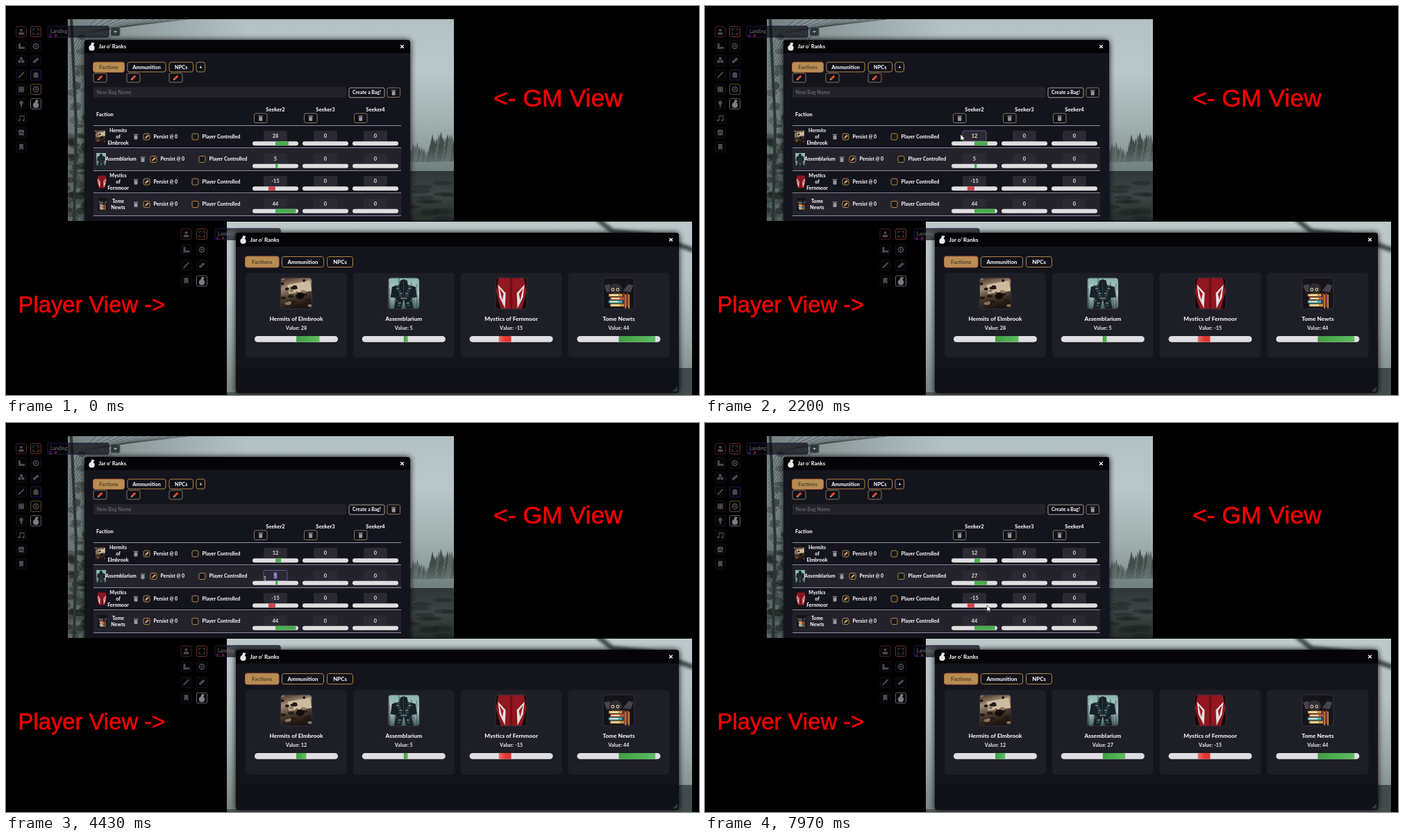
An HTML page with a canvas for the animation above (8000 ms loop, 998 by 561 pixels).

```html
<!DOCTYPE html>
<html lang="en">
<head>
<meta charset="utf-8">
<title>Faction tracker</title>
<style>
  html, body { margin: 0; width: 100%; height: 100%; overflow: hidden; background: #000; }
  canvas { display: block; }
</style>
</head>
<body>
<canvas id="stage" width="998" height="561"></canvas>
<script>
const ctx = document.getElementById('stage').getContext('2d');
const LOOP = 8000, TAN = '#b08648', WHITE = '#f3f2f5', INK = '#101018', TITLE = 'Jar o\u2019 Ranks';
const FACTIONS = ['Hermits of Elmbrook', 'Assemblarium', 'Mystics of Fernmoor', 'Tome Newts'];
const START_VALUES = [28, 5, -15, 44];
const EDITS = [
  { row: 0, value: 12, focus: 1150, type: 1900, commit: 2500, sync: 3300 },
  { row: 1, value: 27, focus: 3900, type: 6100, commit: 6550, sync: 6800 }
];
const MOVE_TIME = 500;
const MOVES = [
  { start: 600, x: 368, y: 185 }, { start: 2400, x: 372, y: 199 },
  { start: 3300, x: 373, y: 224 }, { start: 7350, x: 406, y: 263 }
];

function rect(x, y, w, h, fill, radius = 0, border) {
  ctx.beginPath();
  ctx.roundRect(x, y, w, h, radius);
  if (fill) { ctx.fillStyle = fill; ctx.fill(); }
  if (border) { ctx.strokeStyle = border; ctx.lineWidth = 1; ctx.stroke(); }
}
function path(pts) {
  ctx.beginPath();
  for (let i = 0; i < pts.length; i += 2) ctx.lineTo(pts[i], pts[i + 1]);
}
function poly(fill, ...pts) {
  path(pts);
  ctx.fillStyle = fill;
  ctx.fill();
}
function line(color, width, ...pts) {
  path(pts);
  ctx.strokeStyle = color;
  ctx.lineWidth = width;
  ctx.stroke();
}
function disc(x, y, rx, ry, fill) {
  ctx.beginPath();
  ctx.ellipse(x, y, rx, ry, 0, 0, 7);
  ctx.fillStyle = fill;
  ctx.fill();
}
function text(str, x, y, size = 7.3, color = WHITE, align = 'left', weight = 800) {
  ctx.font = `${weight} ${size}px Lato, sans-serif`;
  ctx.textAlign = align;
  ctx.textBaseline = 'middle';
  ctx.fillStyle = color;
  ctx.fillText(str, x, y + .3);
}
function caption(str, x, baseline, size) {
  ctx.font = `${size}px "Liberation Sans", Arial, sans-serif`;
  ctx.textAlign = 'left';
  ctx.textBaseline = 'alphabetic';
  ctx.fillStyle = ctx.strokeStyle = '#f00';
  ctx.lineWidth = .5;
  ctx.fillText(str, x, baseline);
  ctx.strokeText(str, x, baseline);
}
function gradient(x0, y0, x1, y1, ...colors) {
  const g = ctx.createLinearGradient(x0, y0, x1, y1);
  colors.forEach((c, i) => g.addColorStop(i / (colors.length - 1), c));
  return g;
}
function at(x, y, draw, sx = 1, sy = sx, angle = 0) {
  ctx.save();
  ctx.translate(x, y);
  ctx.rotate(angle);
  ctx.scale(sx, sy);
  draw();
  ctx.restore();
}
function mirrored(x, draw) {
  at(x, 0, draw);
  at(x, 0, draw, -1, 1);
}
function clipped(x, y, w, h, draw, radius = 0) {
  ctx.save();
  ctx.beginPath();
  ctx.roundRect(x, y, w, h, radius);
  ctx.clip();
  draw();
  ctx.restore();
}
function random(seed) {
  const s = Math.sin(seed * 127.1) * 43758.5453;
  return s - Math.floor(s);
}

function bag(x, y, color) {
  disc(x, y + 2, 4.2, 4, color);
  poly(color, x - 2, y - 1, x, y - 6, x + 4, y - 5, x + 2, y - 1);
}
function trash(x, y) {
  rect(x - 2.5, y - 2, 5, 6, '#99969f', 1);
  rect(x - 3.3, y - 3.7, 6.6, 1.1, '#99969f');
}
function trashButton(x, y) {
  rect(x, y, 18.5, 13.5, INK, 2, '#86765c');
  trash(x + 9.2, y + 6.8);
}
function pencil(x, y, color) {
  at(x, y, () => {
    rect(-3, -1.5, 7, 3, color, .5);
    poly('#eab48b', -3, -1.5, -5, 0, -3, 1.5);
  }, 1, 1, -Math.PI / 4);
}
function checkbox(x, y, checked) {
  rect(x - 4.5, y - 4.5, 9, 9, '#18151b', 2, TAN);
  if (checked) at(x, y, () => pencil(.5, 0, '#d8a55c'), .75);
}
function tab(label, x, y, w, h, size, active) {
  rect(x, y, w, h, active ? '#b78d53' : INK, 3, active ? '#b0653a' : TAN);
  text(label, x + w / 2, y + h / 2, size, active ? '#5a452c' : WHITE, 'center');
}
function bar(cx, y, half, height, value, unit, shade) {
  const w = Math.abs(value) * unit;
  rect(cx - half, y, half * 2, height, '#dfdfe1', height / 2);
  rect(value < 0 ? cx - w : cx, y, w, height, shade(value < 0, cx, w), 1);
}

const GLYPHS = {
  user: c => { disc(0, -2, 2, 2, c); rect(-4, 1, 8, 3.5, c, 2); },
  expand: c => { rect(-4, -4, 8, 8, null, 0, c); rect(-5, -1, 10, 2, '#060609'); rect(-1, -5, 2, 10, '#060609'); },
  ruler: c => { rect(-4, -4, 3, 8, c); rect(-4, 1, 9, 3, c); },
  target: c => { disc(0, 0, 4.4, 4.4, c); disc(0, 0, 2.8, 2.8, '#08080b'); disc(0, 0, 1.4, 1.4, c); },
  cubes: c => { for (let k = 0; k < 3; k++) disc(2.8 * Math.sin(k * 2.1), -2.8 * Math.cos(k * 2.1), 2.3, 2.3, c); },
  stick: c => line(c, 3.4, -3.5, 3, 3.5, -3),
  pencil: c => line(c, 2, -4, 4, 4, -4),
  ghost: c => rect(-3.5, -4, 7, 8, c, [4, 4, 1, 1]),
  dice: c => { rect(-4, -4, 8, 8, c, 1); for (let k = 0; k < 4; k++) disc(k % 2 * 4 - 2, k > 1 ? 2 : -2, .8, .8, '#08080b'); },
  bulb: c => { disc(0, -1.5, 2.8, 3, c); rect(-1, 1, 2, 4, c); },
  music: c => { for (const x of [-3, 3]) { disc(x, 3, 1.7, 1.4, c); rect(x + .7, -4, 1, 7, c); } rect(-2, -4, 6, 1.5, c); },
  map: c => { rect(-4, -4, 8, 8, c, 1); line('#08080b', 1, -4, 2, 0, -1, 4, 2); },
  mark: c => poly(c, -3, -4.5, 3, -4.5, 3, 4.5, 0, 2, -3, 4.5),
  bag: () => bag(0, 0, '#7c7c80')
};
const TOOL_BORDERS = { user: '#4a1a16', expand: '#70301c', ghost: '#1e2058', bag: '#626267' };
function toolColumn(x, y, step, names) {
  names.split(' ').forEach((name, i) => at(x, y + i * step, () => {
    rect(-7.5, -7.5, 15, 15, '#050507', 2, TOOL_BORDERS[name] || '#121215');
    GLYPHS[name]('#4b4b4f');
  }));
}
function toolbars() {
  toolColumn(22, 37, 20.8, 'user ruler cubes pencil dice bulb music map mark');
  toolColumn(43, 37, 20.8, 'expand target stick ghost target bag');
  rect(35.5, 112.7, 15, 15, null, 2, '#68472a');
  toolColumn(259.5, 329, 22.5, 'user ruler pencil mark');
  toolColumn(282, 329, 22.5, 'expand target stick bag');
}
function sceneTab(x, y, w) {
  rect(x, y, w, 16, 'rgba(8,9,15,.65)', 2, '#1a1940');
  text('Landing', x + 4, y + 8, 7, '#77757f', 'left', 400);
  text('G', x + 2, y + 14, 5.5, '#7a2aa0');
  text('P', x + 10, y + 14, 5.5, '#b02a3a');
}

function pine(x, base, h, color) {
  for (let k = 0; k < 4; k++) {
    const top = base - h + k * h * .2, w = h * (.07 + k * .045);
    poly(color, x, top, x - w, top + h * .35, x + w, top + h * .35);
  }
}
function masterScene() {
  clipped(89, 19, 556, 291, () => {
    rect(89, 19, 556, 291, gradient(0, 19, 0, 240, '#b3c1c4', '#bac7c9', '#a3b1b1', '#7d8b89'));
    rect(89, 19, 260, 291, gradient(89, 0, 349, 0, 'rgba(60,70,70,.55)', 'rgba(90,100,100,0)'));
    for (let i = 0; i < 70; i++) {
      const y = 45 + 265 * Math.sqrt(random(i)), x = 89 + 26 * random(i + 100);
      disc(x, y, 3 + 6 * random(i + 200), 2 + 4 * random(i + 300), `rgba(28,36,33,${.2 + .4 * random(i + 400)})`);
    }
    for (let i = 0; i < 12; i++) line('rgba(45,54,53,.6)', 1, 92, 70 + i * 6, 105 + i * 5, 42 - i, 130 + i * 12, 19);
    line('#2c3432', 4, 98, 310, 101, 170, 94, 19);
    for (let i = 0; i < 22; i++) {
      const x = 580 + i * 3.1;
      pine(x, 226, 14 + 18 * random(i) + (x > 610 ? 14 : 0), random(i + 50) > .5 ? '#414d4a' : '#5a6764');
    }
    rect(573, 205, 72, 33, gradient(0, 205, 0, 238, 'rgba(110,124,121,0)', '#74827f'));
    rect(573, 238, 72, 72, gradient(0, 238, 0, 310, '#2f3837', '#3b4543', '#252c2a'));
    for (let i = 0; i < 14; i++) disc(582 + 63 * random(i + 9), 250 + 58 * random(i + 70), 14, 3, 'rgba(20,26,25,.35)');
  });
}
function playerScene() {
  clipped(318, 311, 670, 250, () => {
    rect(318, 311, 670, 250, gradient(0, 311, 0, 561, '#bdc9ca', '#b4c1c1', '#9aa8a7', '#75827f'));
    ctx.save();
    ctx.filter = 'blur(2px)';
    line('#3c4646', 7, 850, 306, 873, 325, 930, 331, 990, 352);
    ctx.restore();
    rect(890, 522, 98, 39, '#434c4c');
    rect(318, 557, 650, 4, '#4b5553');
  });
}
function windowFrame(x, y, w, h, titleHeight, size) {
  const cy = y + titleHeight / 2, cx = x + w - 11.5;
  ctx.save();
  ctx.shadowColor = '#000';
  ctx.shadowBlur = 8;
  rect(x, y, w, h, '#14141d', 4);
  ctx.restore();
  rect(x, y, w, titleHeight, '#050507', [4, 4, 0, 0]);
  bag(x + 10.5, cy, '#e8e8ea');
  text(TITLE, x + 20.5, cy, size);
  for (const s of [-2.3, 2.3]) line(WHITE, 1.5, cx - 2.3, cy - s, cx + 2.3, cy + s);
}

// Emblems are drawn in a 45 by 45 box.
const EMBLEMS = [
  () => {
    rect(0, 0, 45, 45, gradient(0, 0, 12, 45, '#3a2b22', '#a48d76', '#4d3b2f', '#1c1410'));
    poly('#cdbb9f', 10, 10, 42, 4, 45, 19, 12, 23);
    for (let i = 0; i < 24; i++) disc(45 * random(i), 45 * random(i + 40), 2 + 4 * random(i + 80), 2, i % 3 ? '#251a15' : '#8b755e');
    disc(28, 26, 6, 5, '#120d0b');
  },
  () => {
    rect(0, 0, 45, 45, gradient(0, 0, 0, 45, '#86b2ac', '#bdd2cc', '#47615e'));
    for (let i = 0; i < 14; i++) rect(45 * random(i), 20 * random(i + 9), 2, 40, 'rgba(18,48,48,.35)');
    mirrored(22.5, () => {
      poly('#172126', 0, 2, 5, 4, 6, 10, 17, 13, 19, 28, 11, 29, 14, 45, 4, 45, 0, 31);
      for (let i = 0; i < 9; i++) disc(2 + 12 * random(i + 5), 12 + i * 3.5, 2.5, 1.2, i % 2 ? '#5d757a' : '#334950');
    });
  },
  () => {
    rect(0, 0, 45, 45, '#16090b');
    mirrored(22.5, () => {
      poly('#911620', 0, 0, 18, 0, 22, 20, 15, 45, 0, 45);
      poly('#e4e0e1', 8, 22, 19, 10, 17, 28, 9, 44);
      poly('#a51b26', 11, 23, 17, 15, 13, 32);
    });
    rect(21, 0, 3, 45, '#6b0f18');
  },
  () => {
    rect(0, 0, 45, 45, '#141318');
    mirrored(22.5, () => poly('#45424a', 6, 19, 14, 9, 21, 11, 17, 21));
    disc(18, 16, 9, 8, '#302c30');
    for (const x of [14, 21]) { disc(x, 17, 2.4, 2.4, '#d8cfae'); disc(x, 17, 1.2, 1.2, '#111'); }
    for (let i = 0; i < 4; i++) {
      rect(8 + i % 2 * 2, 23 + i * 4.8, 20, 4, `hsl(${[38, 12, 188, 42][i]} 50% 50%)`, 1);
      rect(10 + i % 2 * 2, 24 + i * 4.8, 12, 2, '#efe1bd');
      rect(29 + i * 2.4, 22 + i % 2 * 2, 2, 20, i % 2 ? '#c48a3c' : '#9f3831');
    }
  }
];

function masterWindow(state) {
  windowFrame(113, 49, 469, 266, 19, 7.5);
  tab('Factions', 125.5, 81, 45, 14.5, 7.3, true);
  tab('Ammunition', 175, 81, 55, 14, 7.3);
  tab('NPCs', 235, 81, 34.5, 14, 7.3);
  tab('+', 274, 81, 12.5, 14, 7.3);
  for (const x of [126, 174, 235]) {
    rect(x, 97, 19, 13, INK, 2, '#86765c');
    pencil(x + 9.5, 103.5, '#dd4f30');
  }
  rect(126, 117, 364, 15, '#25232a', 2);
  text('New Bag Name', 130.5, 124.5, 7.3, '#77737a', 'left', 400);
  rect(494, 118, 51, 14, INK, 2, '#a99f90');
  text('Create a Bag!', 519.5, 124.8, 6.9, WHITE, 'center');
  trashButton(549, 118);
  text('Faction', 130, 156.5, 7.5);
  for (let c = 0; c < 3; c++) {
    text('Seeker' + (c + 2), 388 + c * 72, 149, 7.5, WHITE, 'center');
    trashButton(357.5 + c * 72, 155);
  }
  for (const y of [206, 271]) rect(126, y, 443, 32, '#24232c');
  for (let i = 0; i < 5; i++) rect(126, Math.round(172 + i * 32.4), 443, 1, '#918fa3');
  FACTIONS.forEach((name, i) => masterRow(name, i, 188.5 + i * 32.5, state));
}
function masterRow(name, row, y, state) {
  const lines = name.split(' '), single = lines.length === 1;
  const nameX = single ? 165.5 : 161.5, x = single ? 197 : 187;
  at(129 + row, y - 9, EMBLEMS[row], 14 / 45, 18 / 45);
  lines.forEach((s, k) => text(s, nameX, y + (k - (lines.length - 1) / 2) * 9.3, 7, WHITE, 'center'));
  trash(x, y);
  checkbox(x + 15.5, y, true);
  text('Persist @ 0', x + 25.5, y, 7);
  checkbox(x + 85.5, y);
  text('Player Controlled', x + 95.5, y, 7.05);
  for (let c = 0; c < 3; c++) masterCell(388 + c * 72, y, c ? 0 : state.master[row], !c && state.active?.row === row, state.typed);
}
function masterCell(cx, y, value, focused, typed) {
  const label = focused && typed || String(value);
  rect(cx - 17, y - 8.5, 34, 15, '#2b2932', 2, focused && '#5e5698');
  if (focused && !typed) rect(cx - label.length * 2.6, y - 6, label.length * 5.2, 10, '#5c50a0');
  text(label, cx, y - 1, 7.4, '#d3d1d7', 'center');
  bar(cx, y + 6.8, 33, 6, value, .67, negative => negative ? '#cf454b' : '#4bad50');
}

function playerWindow(values) {
  windowFrame(331, 327, 638, 231, 20, 8);
  tab('Factions', 344.5, 361, 48.5, 16, 7.9, true);
  tab('Ammunition', 397.5, 361.5, 60, 15, 7.9);
  tab('NPCs', 462.5, 361.5, 37, 15, 7.9);
  rect(331, 521, 638, 37, 'rgba(0,0,0,.15)');
  FACTIONS.forEach((name, i) => {
    const cx = 418 + i * 154.8;
    rect(cx - 73, 385, 146, 122, '#1e1e26', 5);
    clipped(cx - 22.5, 392, 45, 45, () => at(cx - 22.5, 392, EMBLEMS[i]), 4);
    rect(cx - 22.5, 392, 45, 45, null, 4, '#35313a');
    text(name, cx, 450.8, 8.3, WHITE, 'center');
    text('Value: ' + values[i], cx, 464.5, 7.3, '#dddbe0', 'center');
    bar(cx, 476, 60, 8.8, values[i], 1.2, (negative, x, w) => negative
      ? gradient(x - w, 0, x, 0, '#e27670', '#e53935', '#dc3834')
      : gradient(x, 0, x + w, 0, '#459a49', '#4caf50', '#62bd64'));
  });
  for (const d of [3, 6]) line('#8d8b92', .8, 967 - d, 556, 967, 556 - d);
}

function stateAt(t) {
  const master = [...START_VALUES], player = [...START_VALUES];
  for (const e of EDITS) {
    if (t >= e.commit) master[e.row] = e.value;
    if (t >= e.sync) player[e.row] = e.value;
  }
  const active = EDITS.find(e => t >= e.focus && t < e.commit);
  const keys = active ? Math.max(0, Math.ceil((t - active.type) / 230)) : 0;
  return { master, player, active, typed: active ? String(active.value).slice(0, keys) : '' };
}
function cursor(t) {
  if (t < MOVES[0].start) return;
  let x = 352, y = 172;
  for (const m of MOVES) {
    const u = Math.min(1, Math.max(0, (t - m.start) / MOVE_TIME)), ease = u * u * (3 - 2 * u);
    x += (m.x - x) * ease;
    y += (m.y - y) * ease;
  }
  const overInput = t > MOVES[2].start + MOVE_TIME && t < MOVES[3].start;
  at(x, y, () => {
    if (overInput) {
      rect(-.5, -3, 1, 7, '#c8c6d0');
      for (const end of [-3, 4]) rect(-1.5, end, 3, .8, '#c8c6d0');
    } else {
      const arrow = [0, 0, 0, 9, 2, 7, 4, 10, 5, 9, 3.7, 6.5, 6.5, 6.5, 0, 0];
      poly('#fff', ...arrow);
      line('#111', .6, ...arrow);
    }
  });
}

function draw() {
  const t = performance.now() % LOOP, state = stateAt(t);
  rect(0, 0, 998, 561, '#000');
  masterScene();
  sceneTab(60, 29, 88);
  rect(151, 30.5, 13, 12.5, '#30373a', 2, '#555c60');
  poly('#a8abad', 155, 36, 160, 36, 157.5, 39);
  clipped(0, 0, 998, 310, () => masterWindow(state));
  playerScene();
  sceneTab(301, 321, 94);
  toolbars();
  playerWindow(state.player);
  caption('<- GM View', 702, 145, 35.5);
  caption('Player View ->', 17.5, 441.5, 32.8);
  cursor(t);
  requestAnimationFrame(draw);
}
draw();
</script>
</body>
</html>
```
